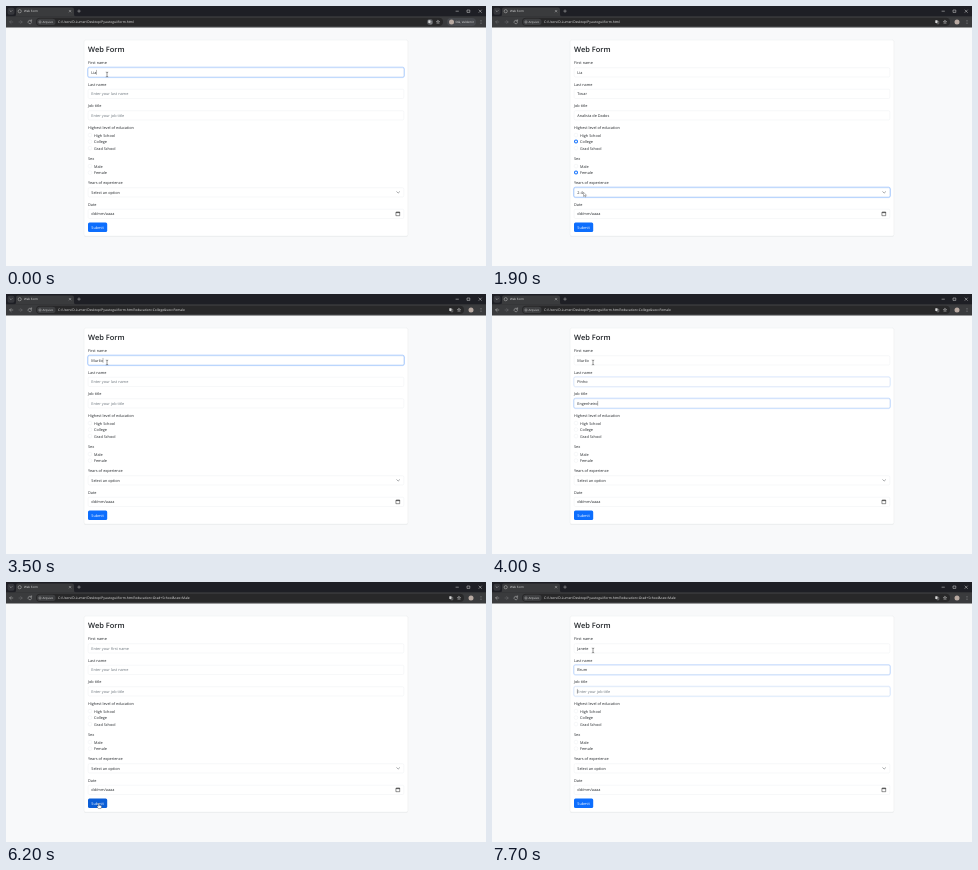
These frames come from a looping animation (480 px wide and 260 px high, 7800 ms). An HTML page:

```html
<!DOCTYPE html>
<html lang="en">
<head>
<meta charset="utf-8">
<title>Web Form</title>
<style>
  html, body { margin: 0; width: 100%; height: 100%; overflow: hidden; background: #f8f9fa; }
  svg { display: block; width: 480px; height: 260px; text-rendering: geometricPrecision; }
  text { font: 3.82px "Open Sans", "Noto Sans", sans-serif; fill: #212529; white-space: pre; }
  .title { font-size: 7.45px; font-weight: 600; }
  .hint { fill: #6c757d; }
  .white { fill: #fff; }
  .ui { font-size: 3.35px; fill: #e3e3e3; }
  .small { font-size: 2.95px; }
  .line { fill: none; stroke-width: .45; stroke-linecap: round; stroke-linejoin: round; }
</style>
</head>
<body>
<svg viewBox="0 0 480 260"><g id="base"></g><g id="live"></g></svg>
<script>
const LOOP = 7800, FADE = 150;
const BLUE = '#0d6efd';

// Each visit: `job` is the moment the job title gets focus, the other steps are offsets from it.
const STEP = { first: -600, last: -280, job: 0, edu: 300, sex: 580, years: 850, value: 1100, submit: 1800 };
const PATH = 'C:/Users/D-Lumer/Desktop/Pyautogui/form.html';
const visits = [
  { from: 0, job: 470, typed: ['Lia', 'Tovar', 'Analista de Dados'], edu: 1, sex: 1, years: '2-4', url: PATH },
  { from: 2500, job: 3900, typed: ['Murilo', 'Pinho', 'Engenheiro'], edu: 2, sex: 0, years: '10+',
    url: PATH + '?education=College&sex=Female' },
  { from: 6100, job: 7650, typed: ['Janete', 'Brum', ''], edu: 0, sex: 0, years: '',
    url: PATH + '?education=Grad+School&sex=Male' }
];
const inputs = [
  { key: 'first', next: 'last', y: 61.6, hint: 'Enter your first name' },
  { key: 'last', next: 'job', y: 83.1, hint: 'Enter your last name' },
  { key: 'job', next: 'edu', y: 104.6, hint: 'Enter your job title' }
];
const YEARS_Y = 181.6, DATE_Y = 203.1;
const eduY = [129.1, 135.6, 142.1], sexY = [160.1, 166.6];

const clamp = v => Math.max(0, Math.min(1, v));
const ease = v => { v = clamp(v); return v * v * (3 - 2 * v); };
const text = (x, y, s, cls = '') =>
  `<text x="${x}" y="${y}" class="${cls}">${s.replace(/&/g, '&amp;')}</text>`;
const mid = (x, y, s, cls) => text(x, y + 1.4, s, cls);
const rect = (x, y, w, h, r, fill, extra = '') =>
  `<rect x="${x}" y="${y}" width="${w}" height="${h}" rx="${r}" fill="${fill}" ${extra}/>`;
const circle = (x, y, r, fill, extra = '') => `<circle cx="${x}" cy="${y}" r="${r}" fill="${fill}" ${extra}/>`;
const line = (d, color, extra = '') => `<path class="line" d="${d}" stroke="${color}" ${extra}/>`;

const pen = document.createElement('canvas').getContext('2d');
pen.font = '38.2px "Open Sans", "Noto Sans", sans-serif';
const widthOf = s => pen.measureText(s).width / 10;

function box(y, glow = 0) {
  const ring = glow && rect(81.5, y - .5, 317, 10.5, 2, 'none', `stroke="${BLUE}" stroke-opacity="${.25 * glow}"`);
  const edge = glow && rect(82.12, y + .12, 315.75, 9.25, 1.4, 'none',
    `stroke="#86b7fe" stroke-width=".3" stroke-opacity="${glow}"`);
  return rect(82.12, y + .12, 315.75, 9.25, 1.4, '#fff', 'stroke="#dee2e6" stroke-width=".25"') +
    (ring || '') + (edge || '');
}

function radio(y, on, glow) {
  return (glow ? circle(84, y, 2.5, 'none', `stroke="${BLUE}" stroke-opacity="${.25 * glow}"`) : '') +
    (on ? circle(84, y, 2, BLUE) + circle(84, y, 1, '#fff')
        : circle(84, y, 1.87, '#fff', 'stroke="#dee2e6" stroke-width=".25"'));
}

function cursor(kind, x, y) {
  const shapes = {
    beam: line('M-.8-2.4Q0-2.4 0-1.9V1.9Q0 2.4-.8 2.4M.8-2.4Q0-2.4 0-1.9M0 1.9Q0 2.4 .8 2.4', '#222'),
    arrow: '<path d="M0 0V4.2L1 3.3L1.7 4.8L2.4 4.5L1.7 3.1H3Z" fill="#fff" stroke="#111" stroke-width=".3"/>',
    hand: '<path d="M-.5 .3Q0-.4 .5 .3V2L2.5 2.5Q3 2.7 2.9 3.4L2.4 5.2H-.4L-1.8 3.3Q-1.7 2.5-.5 3Z" fill="#fff" stroke="#111" stroke-width=".3"/>'
  };
  return `<g transform="translate(${x} ${y})">${shapes[kind]}</g>`;
}

function basePicture() {
  const grey = '#c7c7c7';
  return rect(0, 0, 480, 260, 0, '#f8f9fa') +
    rect(0, 0, 480, 12, 0, '#1e1f25') +
    rect(0, 10.3, 480, 11.2, 0, '#3a3b3d') +
    rect(1.5, 1.8, 7, 7, 2, '#35363b') + line('M3.9 4.6L5 5.7L6.1 4.6', grey) +
    `<path d="M8 10.4Q10 10.4 10 8.4V3.5Q10 1.5 12 1.5H66Q68 1.5 68 3.5V8.4Q68 10.4 70 10.4Z" fill="#3a3b3d"/>` +
    circle(13.7, 5.2, 1.6, 'none', `stroke="${grey}" stroke-width=".5"`) +
    text(18, 6.3, 'Web Form', 'ui small') +
    line('M63.2 4.3L64.9 6M64.9 4.3L63.2 6M71.7 5.1H74.3M73 3.8V6.4', grey) +
    line('M450 5.2H452.4M461.4 4H463.8V6.4H461.4ZM473 4L475.4 6.4M475.4 4L473 6.4', '#eee') +
    line('M25.4 15A1.8 1.8 0 1 0 25.6 16.6M25.6 13.8V15.2H24.2', grey) +
    [14.4, 15.9, 17.4].map(y => circle(475, y, .4, grey)).join('') +
    rect(78, 34.4, 324, 196.7, 1.6, '#000', 'opacity=".035"') +
    rect(78.1, 34.1, 323.8, 196, 1.5, '#fff', 'stroke="#dfe2e4" stroke-width=".3"') +
    text(82, 45.6, 'Web Form', 'title') +
    [[56.6, 'First name'], [78.1, 'Last name'], [99.6, 'Job title'], [121.1, 'Highest level of education'],
     [152.1, 'Sex'], [176.6, 'Years of experience'], [198.1, 'Date']].map(([y, s]) => mid(82, y, s)).join('') +
    ['High School', 'College', 'Grad School'].map((s, i) => mid(88, eduY[i], s)).join('') +
    ['Male', 'Female'].map((s, i) => mid(88, sexY[i], s)).join('') +
    box(DATE_Y) + mid(85.3, DATE_Y + 4.75, 'dd/mm/aaaa') +
    line('M390.3 206.3H393.7V209.7H390.3ZM390.3 206.7H393.7M391.1 205.8V206.3M392.9 205.8V206.3', '#111');
}

function toolbar(t, visit) {
  const shrink = ease((t - 300) / 250);
  const shift = 21 * shrink, grey = '#c7c7c7', dim = '#77787a';
  const back = visit === visits[0] ? dim : grey;
  const avatarX = 445.5 + 19.5 * shrink;
  return line('M6.8 16H3.7M5.1 14.5L3.6 16L5.1 17.5', back) +
    line('M13 16H16.1M14.7 14.5L16.2 16L14.7 17.5', dim) +
    rect(30, 11.8, 407 + shift, 8.3, 4.1, '#282829') +
    rect(31, 12.8, 18.6, 6.3, 3.1, '#3d3e40') +
    circle(34, 16, 1.2, 'none', `stroke="${grey}" stroke-width=".35"`) + line('M34 15.9V16.5', grey) +
    text(36.6, 17.1, 'Arquivo', 'ui small') +
    text(52, 17.2, visit.url, 'ui') +
    `<g transform="translate(${424 + shift} 16)">` +
      circle(0, 0, 3, '#55575b', `opacity="${1 - shrink}"`) +
      rect(-1.7, -1.7, 2.2, 2.6, .3, '#d8d8d8') +
      rect(-.2, -.7, 2, 2.5, .3, 'none', 'stroke="#d8d8d8" stroke-width=".35"') + '</g>' +
    `<path transform="translate(${432 + shift} 16)" class="line" stroke="${grey}"
      d="M0-1.7L.5-.5L1.7-.5L.8.3L1.1 1.5L0 .8L-1.1 1.5L-.8.3L-1.7-.5L-.5-.5Z"/>` +
    `<g opacity="${1 - shrink}">` +
      rect(441 + shift, 12, 29 - shift, 8, 4, '#47494d') +
      (shrink < .3 ? text(449.5, 17, 'Olá, Valdemir', 'ui small') : '') + '</g>' +
    circle(avatarX, 16, 2.5, '#b9aaa2');
}

function livePicture(t) {
  const visit = visits.filter(v => v.from <= t).pop();
  const since = key => t - visit.job - STEP[key];
  const reached = key => since(key) >= 0;
  const glow = (on, off) => clamp(since(on) / FADE) - clamp(since(off) / FADE);

  let out = toolbar(t, visit);

  inputs.forEach(({ key, next, y, hint }, i) => {
    const count = Math.max(0, Math.floor((since(key) - 55) / 4));
    const value = visit.typed[i].slice(0, count);
    out += box(y, glow(key, next)) + mid(85.3, y + 4.75, value || hint, value ? '' : 'hint');
    if (reached(key) && !reached(next)) {
      const x = 85.4 + widthOf(value);
      out += line(`M${x} ${y + 2.7}V${y + 6.8}`, '#111', 'style="stroke-width:.3"');
    }
  });

  const group = (ys, key, next, choice) => ys.forEach((y, i) => {
    const on = i === choice && reached(key);
    out += radio(y, on, on ? glow(key, next) : 0);
  });
  group(eduY, 'edu', 'sex', visit.edu);
  group(sexY, 'sex', 'years', visit.sex);

  out += box(YEARS_Y, clamp(since('years') / FADE)) +
    mid(85.3, YEARS_Y + 4.75, reached('value') ? visit.years : 'Select an option') +
    line('M390.8 185.7L392.2 187.1L393.6 185.7', '#343a40');

  const onSubmit = reached('submit') || !reached('first');
  out += rect(82, 216.6, 19.2, 9.5, 1.5, onSubmit ? '#0b5ed7' : BLUE) + mid(85.3, 221.35, 'Submit', 'white');

  if (onSubmit) out += cursor('hand', 92.7, 221.3);
  else if (reached('years')) out += cursor('arrow', 91.5, 186.2);
  else if (reached('sex')) out += cursor('arrow', 84, sexY[visit.sex]);
  else if (reached('edu')) out += cursor('arrow', 84, eduY[visit.edu]);
  else out += cursor('beam', 101, 68.5);
  return out;
}

document.getElementById('base').innerHTML = basePicture();
const live = document.getElementById('live');
const start = performance.now();
function frame() {
  live.innerHTML = livePicture((performance.now() - start) % LOOP);
  requestAnimationFrame(frame);
}
frame();
</script>
</body>
</html>
```
